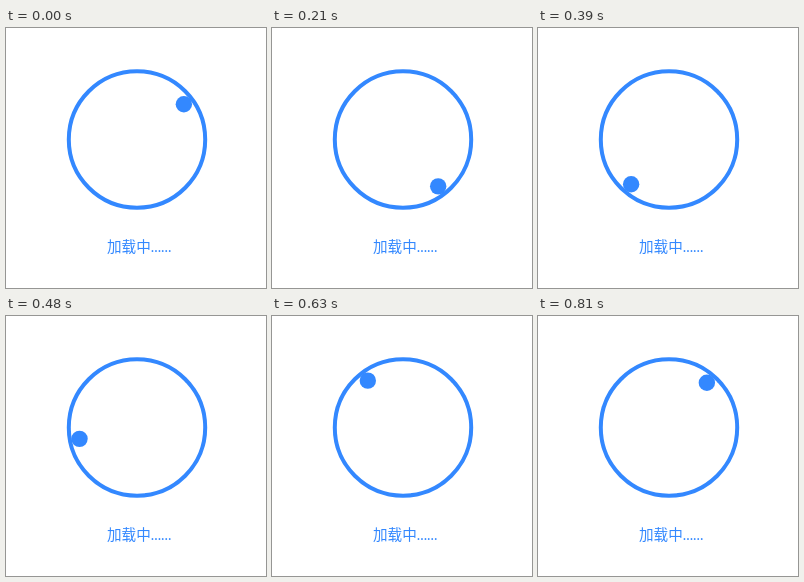
Animation, 260 px wide and 260 px high, one loop 840 ms. Source, as an HTML page:

```html
<!DOCTYPE html>
<html lang="zh-CN">
<head>
<meta charset="utf-8">
<title>加载中</title>
<style>
  html, body { margin: 0; width: 100%; height: 100%; overflow: hidden; background: #fff; }
  svg { display: block; width: 100vw; height: 100vh; }
  text { font: 14.6px Lato, "Noto Sans CJK SC", "Noto Sans CJK", sans-serif; }
</style>
</head>
<body>
<svg viewBox="0 0 260 260" fill="#3388ff">
  <circle cx="131" cy="111.5" r="68.2" fill="none" stroke="#3388ff" stroke-width="4"/>
  <circle id="dot" r="8.2"/>
  <text x="101" y="223.5">加载中......</text>
</svg>
<script>
  const LOOP = 840, STEP = 30, ORBIT = 58.6, START = -36.9;
  const dot = document.getElementById('dot');

  function draw() {
    const time = Math.floor(performance.now() % LOOP / STEP) * STEP;
    const angle = (START + 360 * time / LOOP) * Math.PI / 180;
    dot.setAttribute('cx', 131 + ORBIT * Math.cos(angle));
    dot.setAttribute('cy', 111.5 + ORBIT * Math.sin(angle));
    requestAnimationFrame(draw);
  }
  draw();
</script>
</body>
</html>
```
